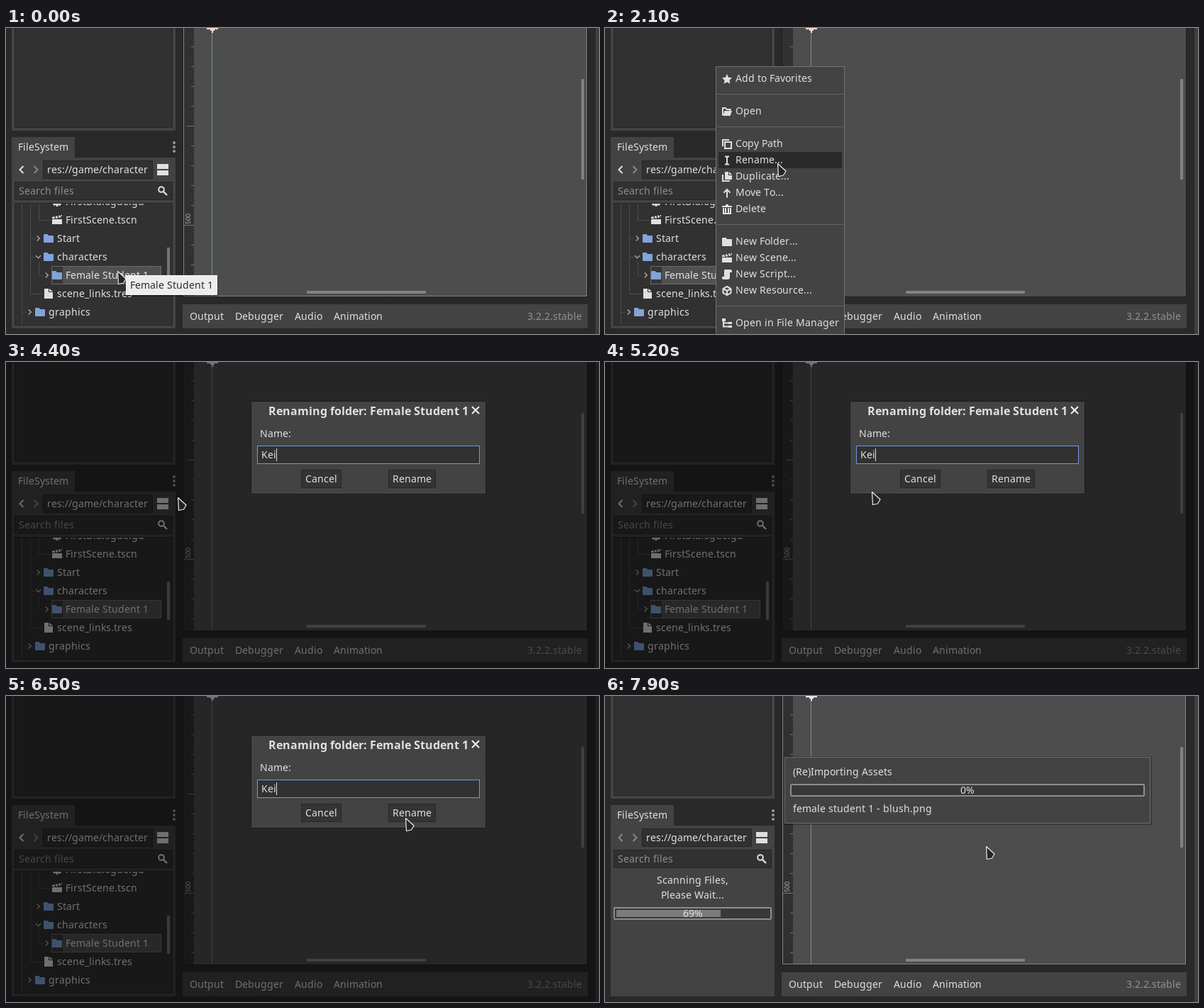
Animation, 836 px wide and 432 px high, one loop 8000 ms. Source, as an HTML page with a canvas:

```html
<!DOCTYPE html>
<html lang="en">
<head>
<meta charset="utf-8">
<title>Rename a folder</title>
<style>
html, body { margin: 0; width: 100%; height: 100%; overflow: hidden; background: #292929; }
canvas { display: block; width: 836px; height: 432px; }
</style>
</head>
<body>
<canvas id="stage" width="836" height="432"></canvas>
<script>
const ctx = document.getElementById('stage').getContext('2d');
const LOOP = 8000, STEP = 100;
const MENU_AT = 600, DIALOG_AT = 2400, IMPORT_AT = 6600;
const KEYS = [3500, 3700, 3900], NEW_NAME = 'Kei';
const C = {
  bg: '#292929', panel: '#434343', field: '#313131', edge: '#252525', view: '#4d4d4d',
  text: '#e0e0e0', faint: '#919191', bar: '#828282', blue: '#82a3db', tree: '#4b4b4b'
};

// Pointer track: time, x, y
const TRACK = [
  [0, 157, 343], [1000, 157, 343], [1900, 243, 191], [4800, 242, 191],
  [5700, 563, 172], [6600, 563, 172], [7000, 569, 176], [7300, 569, 176], [7800, 537, 212]
];

function pointer(t) {
  let i = TRACK.length - 1;
  while (TRACK[i][0] > t) i--;
  const a = TRACK[i], b = TRACK[i + 1] || a;
  const p = b === a ? 0 : (t - a[0]) / (b[0] - a[0]);
  const e = p * p * (3 - 2 * p);
  return [Math.round(a[1] + (b[1] - a[1]) * e), Math.round(a[2] + (b[2] - a[2]) * e)];
}

function box(x, y, x2, y2, fill, line) {
  ctx.fillStyle = fill;
  ctx.fillRect(x, y, x2 - x, y2 - y);
  if (line) {
    ctx.strokeStyle = line;
    ctx.lineWidth = 1;
    ctx.strokeRect(x + .5, y + .5, x2 - x - 1, y2 - y - 1);
  }
}

// Whole-pixel advances, as in the editor's own text layout
const widths = new Map();
function advance(ch, size, weight) {
  const key = ch + size + weight;
  if (!widths.has(key)) {
    ctx.font = `${weight} ${size * 50}px "Noto Sans", sans-serif`;
    widths.set(key, Math.round(ctx.measureText(ch).width / 50));
  }
  return widths.get(key);
}
function textWidth(s, size = 14, weight = 400) {
  let w = 0;
  for (const ch of s) w += advance(ch, size, weight);
  return w;
}
function text(s, x, mid, color = C.text, size = 14, weight = 400) {
  const steps = [...s].map(ch => advance(ch, size, weight));
  ctx.font = `${weight} ${size}px "Noto Sans", sans-serif`;
  ctx.fillStyle = color;
  [...s].forEach((ch, i) => {
    ctx.fillText(ch, x, mid + Math.round(size * .36));
    x += steps[i];
  });
}
function centered(s, cx, mid, color, size, weight) {
  text(s, Math.round(cx - textWidth(s, size, weight) / 2), mid, color, size, weight);
}

// 14 x 14 icons: filled path, stroked path
const ICONS = {
  star: ['M7 0L9.1 4.7 14 5.3 10.4 8.7 11.4 13.7 7 11.2 2.6 13.7 3.6 8.7 0 5.3 4.9 4.7Z'],
  folder: ['M0 2Q0 1 1 1H5.5L7 3H13Q14 3 14 4V12Q14 13 13 13H1Q0 13 0 12Z'],
  open: ['M3.5 6H14L11.5 13H1.5Z', 'M1 12.5V2H5L6.5 4H11.5V6'],
  copy: ['', 'M4 4H13V13H4ZM1 10V1H10'],
  ibeam: ['', 'M4 1.5H10M7 1.5V12.5M4 12.5H10'],
  duplicate: ['M4 0H9V5H14V11H4ZM10 0L14 4H10Z', 'M1 4V13H11'],
  move: ['', 'M7 13.5V2M2.5 6.5L7 2 11.5 6.5'],
  trash: ['M5 0H9V2H14V4H0V2H5Z', 'M2 5V13H12V5M5 5V12M9 5V12'],
  clapper: ['M0 6H14V13H0ZM0 3L3 2 4.5 5H0ZM4.5 1.7L7 1.2 8.5 4.3 6 5ZM8.5 1L11 .4 12.5 3.5 10 4ZM12 0L14 0 14 3Z'],
  script: ['M4 0H12Q14 0 14 2V4H11V11Q11 14 8 14H2Q0 14 0 12V10H3V2Q3 0 4 0Z'],
  cube: ['', 'M7 1L12.5 4V10L7 13 1.5 10V4ZM1.5 4L7 7 12.5 4M7 7V13'],
  hierarchy: ['M0 0H5V4H0ZM9 5H14V8H9ZM9 10H14V13H9Z', 'M2 4V11.5H9M2 6.5H9'],
  file: ['M1 0H7V5H13V14H1ZM8 0L13 4H8Z'],
  gear: ['M5.5 0H8.5V2.5L11 1 13 3 11.5 5.5H14V8.5H11.5L13 11 11 13 8.5 11.5V14H5.5V11.5L3 13 1 11 2.5 8.5H0V5.5H2.5L1 3 3 1 5.5 2.5Z']
};
for (const k in ICONS) ICONS[k] = ICONS[k].map(d => new Path2D(d));

function icon(name, x, y, color = C.text) {
  const [fill, line] = ICONS[name];
  ctx.save();
  ctx.translate(x, y);
  ctx.fillStyle = ctx.strokeStyle = color;
  ctx.fill(fill);
  ctx.lineWidth = 2;
  if (line) ctx.stroke(line);
  ctx.restore();
}

function lines(color, width, ...paths) {
  ctx.strokeStyle = color;
  ctx.lineWidth = width;
  ctx.beginPath();
  for (const p of paths) {
    ctx.moveTo(p[0], p[1]);
    for (let i = 2; i < p.length; i += 2) ctx.lineTo(p[i], p[i + 1]);
  }
  ctx.stroke();
}

function chevron(x, y, dir, color, s = 4, w = 2) {
  const [dx, dy] = dir === 'down' ? [s, s / 2] : [s / 2, s];
  if (dir === 'down') lines(color, w, [x - dx, y - dy, x, y + dy, x + dx, y - dy]);
  else {
    const k = dir === 'left' ? -1 : 1;
    lines(color, w, [x - k * dx, y - dy, x + k * dx, y, x - k * dx, y + dy]);
  }
}

function fileTree() {
  box(12, 247, 235, 420, C.field, C.edge);
  ctx.save();
  ctx.beginPath();
  ctx.rect(13, 248, 221, 171);
  ctx.clip();
  lines(C.tree, 1,
    [22.5, 247, 22.5, 420], [22, 401.5, 29, 401.5],
    [34.5, 247, 34.5, 375.5, 52, 375.5], [34, 297.5, 41, 297.5], [34, 323.5, 41, 323.5],
    [46.5, 247, 46.5, 271.5, 63, 271.5], [46.5, 330, 46.5, 349.5, 53, 349.5]);
  box(64, 336, 219, 362, '#505050', '#6a6a6a');
  box(65, 337, 80, 361, '#363636');
  icon('gear', 65, 238);
  text('FirstDialogue.gd', 84, 245);
  icon('clapper', 65, 264);
  text('FirstScene.tscn', 84, 271);
  for (const [name, x, y] of [['Start', 53, 297], ['characters', 53, 323],
    ['Female Student 1', 65, 349], ['graphics', 41, 401]]) {
    chevron(x - 7.5, y, name === 'characters' ? 'down' : 'right', '#a5a5a5', 3.5, 1.5);
    icon('folder', x, y - 7, C.blue);
    text(name, x + 19, y);
  }
  icon('file', 53, 368);
  text('scene_links.tres', 72, 375);
  ctx.restore();
  box(227, 310, 231, 364, '#747474');
}

function progress(x, y, x2, y2, part, label) {
  box(x, y, x2, y2, '#383838');
  ctx.strokeStyle = '#8e8e8e';
  ctx.lineWidth = 2;
  ctx.beginPath();
  ctx.roundRect(x + 1, y + 1, x2 - x - 2, y2 - y - 2, 1);
  ctx.stroke();
  if (part) box(x + 4, y + 4, x + 4 + Math.round((x2 - x - 10) * part), y2 - 4, '#7c7c7c');
  centered(label, (x + x2) / 2, (y + y2) / 2);
}

function dock(scanning) {
  box(8, 0, 239, 145, C.panel);
  box(12, -2, 235, 141, C.field, C.edge);
  box(8, 154, 97, 184, C.panel);
  box(8, 183, 239, 424, C.panel);
  text('FileSystem', 17, 168);
  ctx.fillStyle = '#9a9a9a';
  for (const y of [162, 168, 174]) {
    ctx.beginPath();
    ctx.arc(237, y, 2, 0, 7);
    ctx.fill();
  }
  chevron(22, 200, 'left', scanning ? '#888' : C.text, 5);
  chevron(42, 200, 'right', '#888', 5);
  box(52, 187, 207, 213, C.field, C.edge);
  text('res://game/character', 58, 200);
  box(213, 192, 229, 199, C.text);
  box(213, 201, 229, 208, C.text);
  box(12, 217, 235, 243, C.field, C.edge);
  text('Search files', 18, 230, '#8e8e8e');
  ctx.strokeStyle = C.text;
  ctx.lineWidth = 2;
  ctx.beginPath();
  ctx.arc(219, 228, 3.8, 0, 7);
  ctx.stroke();
  lines(C.text, 2.4, [222, 231, 227, 236]);
  if (scanning) {
    centered('Scanning Files,', 123.5, 260);
    centered('Please Wait...', 123.5, 281);
    progress(12, 298, 235, 316, .69, '69%');
  } else fileTree();
}

function viewport(focused, axis, cross) {
  box(249, 0, 820, 380, '#202020');
  box(250, 0, 819, 379, C.view);
  box(250, 0, 265, 379, C.field);
  for (let i = 0; i < 13; i++) {
    const y = 26 + i * 28, long = i === 4 ? 10 : i === 9 ? 14 : 4;
    box(265 - long, y, 265, y + 1, '#747474');
  }
  ctx.save();
  ctx.translate(257, 277);
  ctx.rotate(-Math.PI / 2);
  text('500', 0, 0, '#b0b0b0', 9);
  ctx.restore();
  box(290, 0, 291, 378, axis);
  box(283, 0, 299, 2, cross);
  box(288, 0, 294, 4, cross);
  box(290, 0, 292, 7, cross);
  if (focused) lines('#858585', 1, [250.5, 0, 250.5, 378.5, 818.5, 378.5, 818.5, 0]);
  ctx.fillStyle = C.bar;
  ctx.beginPath();
  ctx.roundRect(811, 72, 4, 142, 1);
  ctx.roundRect(424, 371, 168, 4, 1);
  ctx.fill();
}

function bottomBar() {
  box(249, 390, 820, 424, C.panel);
  text('Output', 259, 407);
  text('Debugger', 323, 407);
  text('Audio', 407, 407);
  text('Animation', 462, 407);
  text('3.2.2.stable', 735, 407, C.faint);
}

function tooltip() {
  box(170, 350, 299, 379, 'rgba(0,0,0,.3)');
  box(169, 349, 298, 377, '#ededed', '#fafafa');
  text('Female Student 1', 175, 363, '#2b2b2b');
}

const MENU = [
  ['star', 'Add to Favorites', 71], ['open', 'Open', 117],
  ['copy', 'Copy Path', 163], ['ibeam', 'Rename...', 186], ['duplicate', 'Duplicate...', 209],
  ['move', 'Move To...', 232], ['trash', 'Delete', 255],
  ['folder', 'New Folder...', 301], ['clapper', 'New Scene...', 324],
  ['script', 'New Script...', 347], ['cube', 'New Resource...', 370],
  ['hierarchy', 'Open in File Manager', 416]
];
function menu(x, y) {
  box(156, 54, 338, 434, C.panel, '#727272');
  for (const s of [93, 139, 277, 392]) box(158, s, 336, s + 1, '#666');
  for (const [name, label, mid] of MENU) {
    if (x > 158 && Math.abs(y - mid) < 11.5) box(160, mid - 11, 334, mid + 12, '#2b2b2b');
    icon(name, 165, mid - 6);
    text(label, 184, mid);
  }
}

function button(label, x, x2) {
  box(x, 152, x2, 178, '#343434', '#282828');
  centered(label, (x + x2) / 2, 165);
}

function dialog(t) {
  box(345, 55, 677, 187, '#1b1b1b');
  box(346, 56, 676, 186, C.panel);
  centered('Renaming folder: Female Student 1', 511, 69, C.text, 16, 700);
  lines('#f0f0f0', 2, [657, 63, 667, 73], [667, 63, 657, 73]);
  text('Name:', 358, 101);
  box(354, 118, 668, 144, C.field, '#699ce8');
  const typed = KEYS.filter(k => k <= t).length;
  if (!typed) {
    box(360, 122, 360 + textWidth('Female Student 1'), 140, '#4d6078');
    text('Female Student 1', 360, 131);
  } else {
    const name = NEW_NAME.slice(0, typed);
    text(name, 360, 131);
    const blink = Math.floor((t - KEYS[typed - 1]) / 650) % 2;
    const cx = 360 + textWidth(name);
    if (!blink) box(cx, 122, cx + 1, 140, C.text);
  }
  button('Cancel', 416, 473);
  button('Rename', 539, 606);
}

function importBox() {
  box(252, 85, 771, 182, 'rgba(0,0,0,.25)');
  box(253, 86, 769, 180, C.panel, '#6e6e6e');
  text('(Re)Importing Assets', 265, 107);
  progress(261, 124, 761, 142, 0, '0%');
  text('female student 1 - blush.png', 265, 159);
}

function drawPointer(x, y) {
  ctx.beginPath();
  for (const [dx, dy] of [[.5, .5], [12, 11], [8.5, 17], [1.5, 18.5]]) ctx.lineTo(x + dx, y + dy);
  ctx.closePath();
  ctx.lineJoin = 'round';
  ctx.fillStyle = '#252525';
  ctx.strokeStyle = '#ececec';
  ctx.lineWidth = 1.2;
  ctx.fill();
  ctx.stroke();
  ctx.lineJoin = 'miter';
}

function draw(t) {
  const renaming = t >= DIALOG_AT && t < IMPORT_AT, importing = t >= IMPORT_AT;
  const [x, y] = pointer(t);
  box(0, 0, 836, 432, C.bg);
  box(831, 0, 836, 432, '#3e3e3e');
  dock(importing);
  const early = t < DIALOG_AT;
  viewport(t < MENU_AT || importing, early ? '#6d9c72' : '#868686', early ? '#f1d9cf' : '#e6e6e6');
  bottomBar();
  if (t < MENU_AT) tooltip();
  else if (early) menu(x, y);
  if (renaming) {
    box(0, 0, 836, 432, 'rgba(0,0,0,.5)');
    dialog(t);
  }
  if (importing) importBox();
  drawPointer(x, y);
}

const start = performance.now();
function tick() {
  const t = (performance.now() - start) % LOOP;
  draw(Math.floor(t / STEP) * STEP);
  requestAnimationFrame(tick);
}
tick();
</script>
</body>
</html>
```
